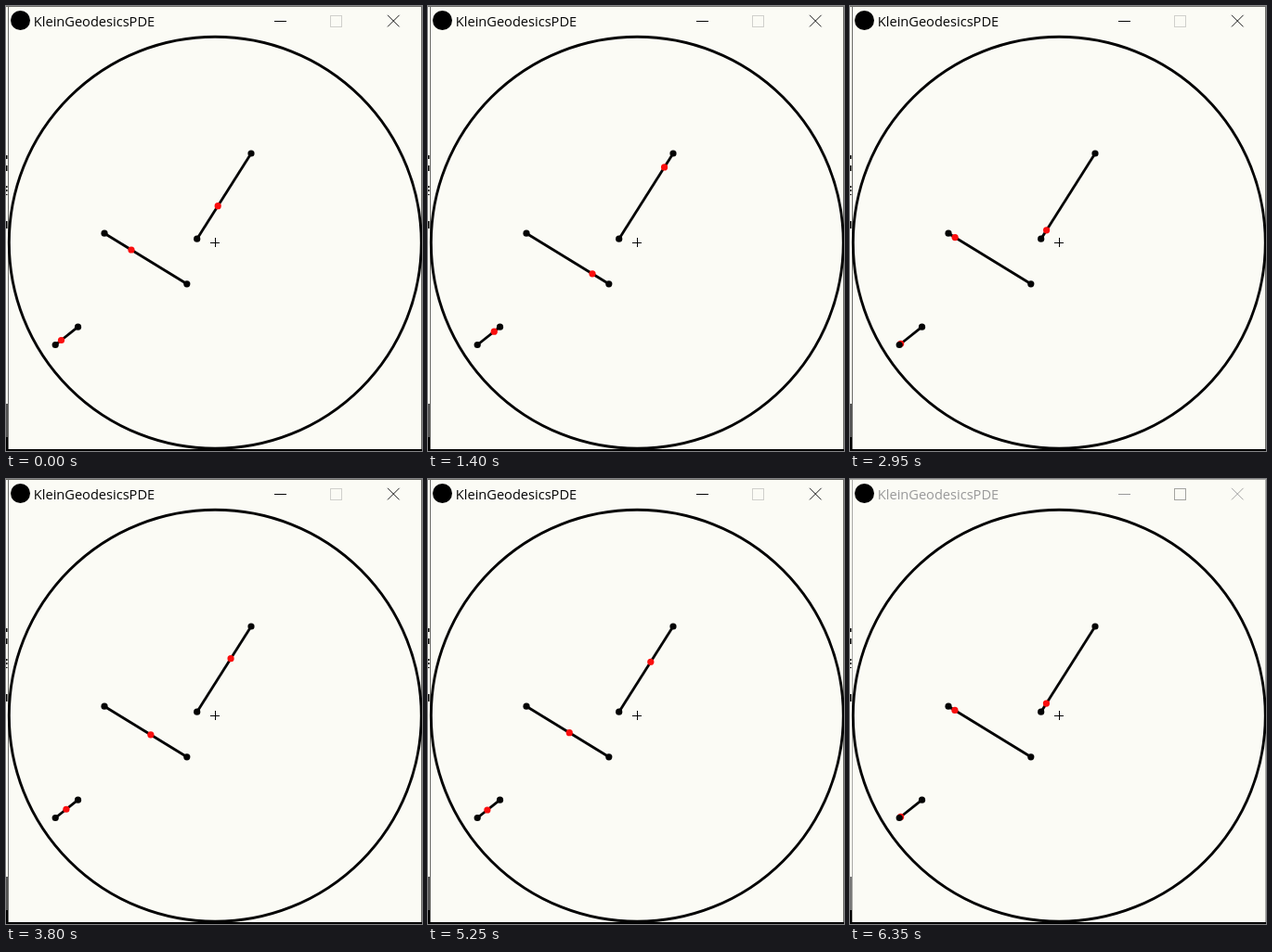
Recreate the animation shown at these times as an HTML page with a canvas. Size 448x480 px, loop 6.4 s.

```html
<!DOCTYPE html>
<html lang="en">
<head>
<meta charset="utf-8">
<title>KleinGeodesicsPDE</title>
<style>
html, body { margin: 0; width: 100%; height: 100%; overflow: hidden; background: #fbfbf5; }
canvas { display: block; }
</style>
</head>
<body>
<canvas id="stage" width="448" height="480"></canvas>
<script>
const ctx = document.getElementById('stage').getContext('2d');
const LOOP = 6400, STEP = 50, HOLD = 650, BLUR_AT = 6350;
const SWEEP = 1702, PEAK = 1088;   // ms for one end-to-end pass, time of the first far end
const CX = 225, CY = 255, R = 222;
const PAPER = '#fbfbf5', INK = '#040404', RED = '#fa0e0e';

const segments = [
  [205.7, 251.2, 264, 159],
  [106, 245.2, 194.8, 299.8],
  [53.2, 365.5, 77.5, 346.2]
];

function rect(color, x, y, w, h) {
  ctx.fillStyle = color;
  ctx.fillRect(x, y, w, h);
}

function dot(color, x, y, r = 3.6) {
  ctx.fillStyle = color;
  ctx.beginPath();
  ctx.arc(x, y, r, 0, 2 * Math.PI);
  ctx.fill();
}

function line(color, width, x1, y1, x2, y2) {
  ctx.strokeStyle = color;
  ctx.lineWidth = width;
  ctx.beginPath();
  ctx.moveTo(x1, y1);
  ctx.lineTo(x2, y2);
  ctx.stroke();
}

// Point at fraction u of the hyperbolic length of a chord piece in the Klein disc
function geodesicPoint([x1, y1, x2, y2], u) {
  const len = Math.hypot(x2 - x1, y2 - y1);
  const dx = (x2 - x1) / len, dy = (y2 - y1) / len;
  const px = x1 - CX, py = y1 - CY;
  const start = px * dx + py * dy;
  const half = Math.sqrt(R * R - px * px - py * py + start * start);
  const a = Math.atanh(start / half), b = Math.atanh((start + len) / half);
  const along = half * Math.tanh(a + (b - a) * u) - start;
  return [x1 + dx * along, y1 + dy * along];
}

// Constant speed back and forth between 0 and 1
function bounce(t) {
  const phase = ((t - PEAK) / SWEEP % 2 + 2) % 2;
  return Math.abs(1 - phase);
}

function drawWindow(active) {
  const ink = active ? INK : '#999';
  const edge = active ? '#6c6c68' : '#aaaaa6';
  rect(PAPER, 0, 0, 448, 480);

  // Slivers of what lies behind the window
  for (const [y, h] of [[161, 4], [172, 6], [194, 2], [198, 2], [203, 1], [232, 8]])
    rect(INK, 0, y, 1.5, h);
  rect(active ? '#555' : '#777', 0, 429, 2, 36);
  rect('#000', 0, 465, 2, 15);

  rect(edge, 2, 0, 1, 478);
  rect(edge, 447, 0, 1, 478);
  rect(edge, 0, 0, 448, 1);
  rect('#000', 0, 478, 448, 2);

  dot('#000', 15.5, 15.5, 10.5);
  ctx.fillStyle = ink;
  ctx.font = '14.6px "Open Sans", "Noto Sans", sans-serif';
  ctx.fillText('KleinGeodesicsPDE', 29.8, 22);

  line(ink, 1, 289, 16.5, 302, 16.5);
  ctx.strokeStyle = active ? '#d0d0cc' : '#a4a4a0';
  ctx.strokeRect(349.5, 10.5, 12, 12);
  line(ink, 0.9, 411, 9.8, 423.6, 22.4);
  line(ink, 0.9, 423.6, 9.8, 411, 22.4);
}

function drawDisc(u) {
  ctx.strokeStyle = INK;
  ctx.lineWidth = 2.9;
  ctx.beginPath();
  ctx.arc(CX + 0.3, CY + 0.2, R, 0, 2 * Math.PI);
  ctx.stroke();

  line(INK, 1, 220, 255.5, 230, 255.5);
  line(INK, 1, 225.5, 250, 225.5, 260);

  for (const s of segments) {
    line(INK, 2.8, ...s);
    dot(RED, ...geodesicPoint(s, u));
    dot(INK, s[0], s[1]);
    dot(INK, s[2], s[3]);
  }
}

function frame() {
  const t = Math.floor(performance.now() % LOOP / STEP) * STEP;
  drawWindow(t < BLUR_AT);
  drawDisc(bounce(t < HOLD ? 0 : t));
  requestAnimationFrame(frame);
}
frame();
</script>
</body>
</html>
```
